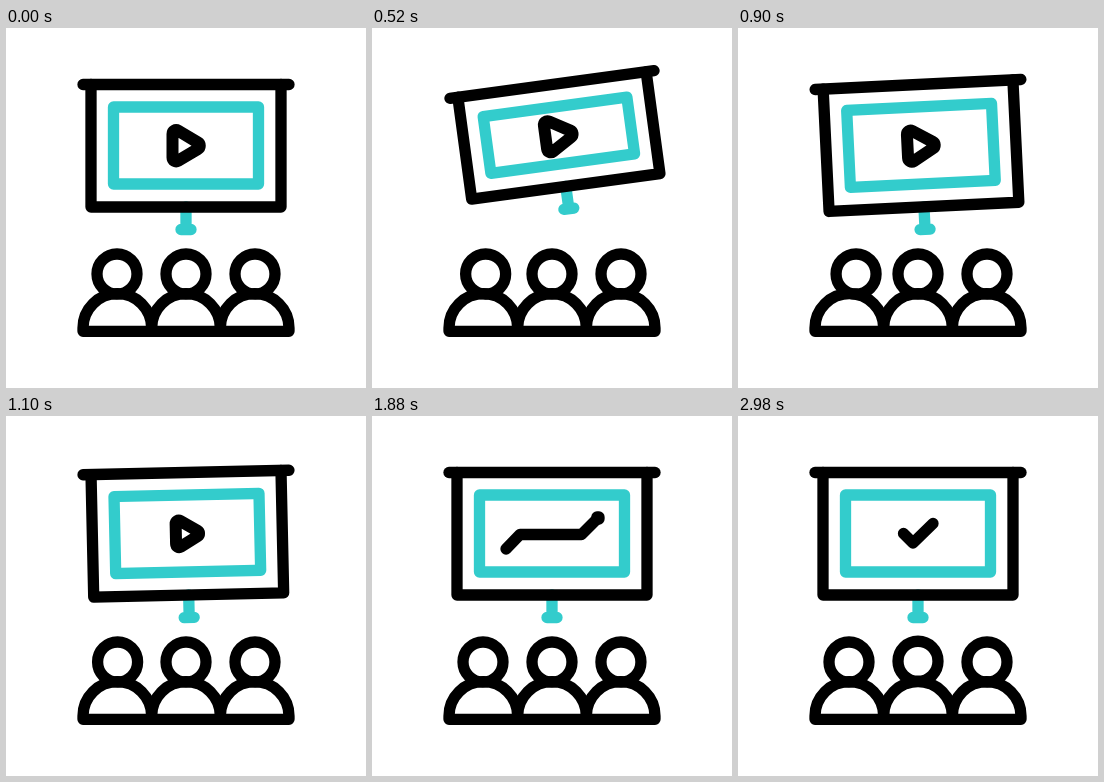
These frames come from a looping animation (360 px wide and 360 px high, 3000 ms). An HTML page:

```html
<!DOCTYPE html>
<html lang="en">
<head>
<meta charset="utf-8">
<title>Presentation</title>
<style>
  html, body { margin: 0; width: 100%; height: 100%; overflow: hidden; background: #fff; }
  svg { display: block; width: 100%; height: 100%; }
  .ink { stroke: #000; }
  .teal { stroke: #33cccc; }
</style>
</head>
<body>
<svg viewBox="0 0 360 360" fill="none" stroke-width="11.3" stroke-linecap="round" stroke-linejoin="round">
  <g id="board">
    <path id="post" class="teal" d="M180 179V201.5M175 201.5H185"/>
    <path id="frame" class="ink"/>
    <rect id="panel" class="teal" x="107.5" y="79" width="145"/>
    <path class="ink" d="M77 56.5H283"/>
    <g id="content" class="ink">
      <path id="play" d="M166.5 106v23.5c0 3 3 4.8 5.6 3.3l19.8-11.8c2.5-1.5 2.5-5 0-6.5l-19.8-11.8c-2.6-1.5-5.6 .3-5.6 3.3z" vector-effect="non-scaling-stroke"/>
      <path id="trend" pathLength="1" d="M134 133L148 118.5H209.5L226 102"/>
      <path id="tip"/>
      <path id="check" pathLength="1" d="M165.5 117.5L175 127L195 107.5"/>
    </g>
  </g>
  <g class="ink">
    <circle id="left" cx="111" cy="246" r="20"/>
    <circle id="middle" cx="180" cy="246" r="20"/>
    <circle id="right" cx="249" cy="246" r="20"/>
    <path d="M77 303.3V300a34.33 34.33 0 0 1 68.67 0V303.3M145.67 300a34.33 34.33 0 0 1 68.67 0V303.3M214.33 300a34.33 34.33 0 0 1 68.67 0V303.3M77 303.3H283"/>
  </g>
</svg>
<script>
const LOOP = 3000;
const el = id => document.getElementById(id);
const set = (id, name, value) => el(id).setAttribute(name, value);
const show = (id, on) => set(id, 'visibility', on ? 'visible' : 'hidden');

// Each track lists [time in ms, value] with eased travel between entries.
const tracks = {
  angle: [[0, 0], [500, -8], [770, 8], [960, -6], [1160, 0]],
  lift: [[0, 0], [500, 20], [770, 0]],
  play: [[1050, 1], [1260, 0]],
  trend: [[1400, 0], [1880, 1], [2420, 1], [2580, 0]],
  tip: [[1840, 0], [1980, 1], [2380, 1], [2440, 0]],
  check: [[2590, 0], [2840, 1]],
  left: [[380, 0], [780, 9.3], [1160, 0]],
  right: [[1150, 0], [1500, -9.3], [1900, 0]],
  middle: [[2270, 0], [2660, -9], [3050, 0]]
};

function at(name, t) {
  const keys = tracks[name];
  const i = keys.findIndex(k => k[0] > t);
  if (i === 0) return keys[0][1];
  if (i < 0) return keys[keys.length - 1][1];
  const [t0, a] = keys[i - 1], [t1, b] = keys[i];
  const p = (t - t0) / (t1 - t0);
  return a + (b - a) * p * p * (3 - 2 * p);
}

function trim(id, amount) {
  set(id, 'stroke-dasharray', `${Math.max(amount, 0.001)} 2`);
}

function draw(t) {
  const lift = at('lift', t);
  set('board', 'transform', `rotate(${at('angle', t)} 180 56.5)`);
  set('frame', 'd', `M85 56.5V${179 - lift}H275V56.5`);
  set('panel', 'height', 77 - lift);
  set('post', 'transform', `translate(0 ${-lift})`);
  set('content', 'transform', `translate(0 ${-lift / 2})`);

  const size = at('play', t);
  const scale = Math.max(size, 0.01);
  show('play', size > 0);
  set('play', 'transform', `translate(180 117.75) scale(${scale}) translate(-180 -117.75)`);
  // Stroke width follows the stage size, then tapers as the sign vanishes.
  const unit = Math.min(innerWidth, innerHeight) / 360;
  set('play', 'stroke-width', 12 * unit * Math.min(1, size * 3));

  show('trend', t >= 1400 && t < 2580);
  trim('trend', at('trend', t));
  const arm = 10 * at('tip', t);
  show('tip', arm > 0);
  set('tip', 'd', `M${227 - arm} 101H227V${101 + arm}`);
  show('check', t >= 2590);
  trim('check', at('check', t));

  set('left', 'cx', 111 + at('left', t));
  set('right', 'cx', 249 + at('right', t));
  set('middle', 'cy', 246 + at('middle', t));
}

const start = performance.now();
function tick() {
  draw((performance.now() - start) % LOOP);
  requestAnimationFrame(tick);
}
draw(0);
requestAnimationFrame(tick);
</script>
</body>
</html>
```
